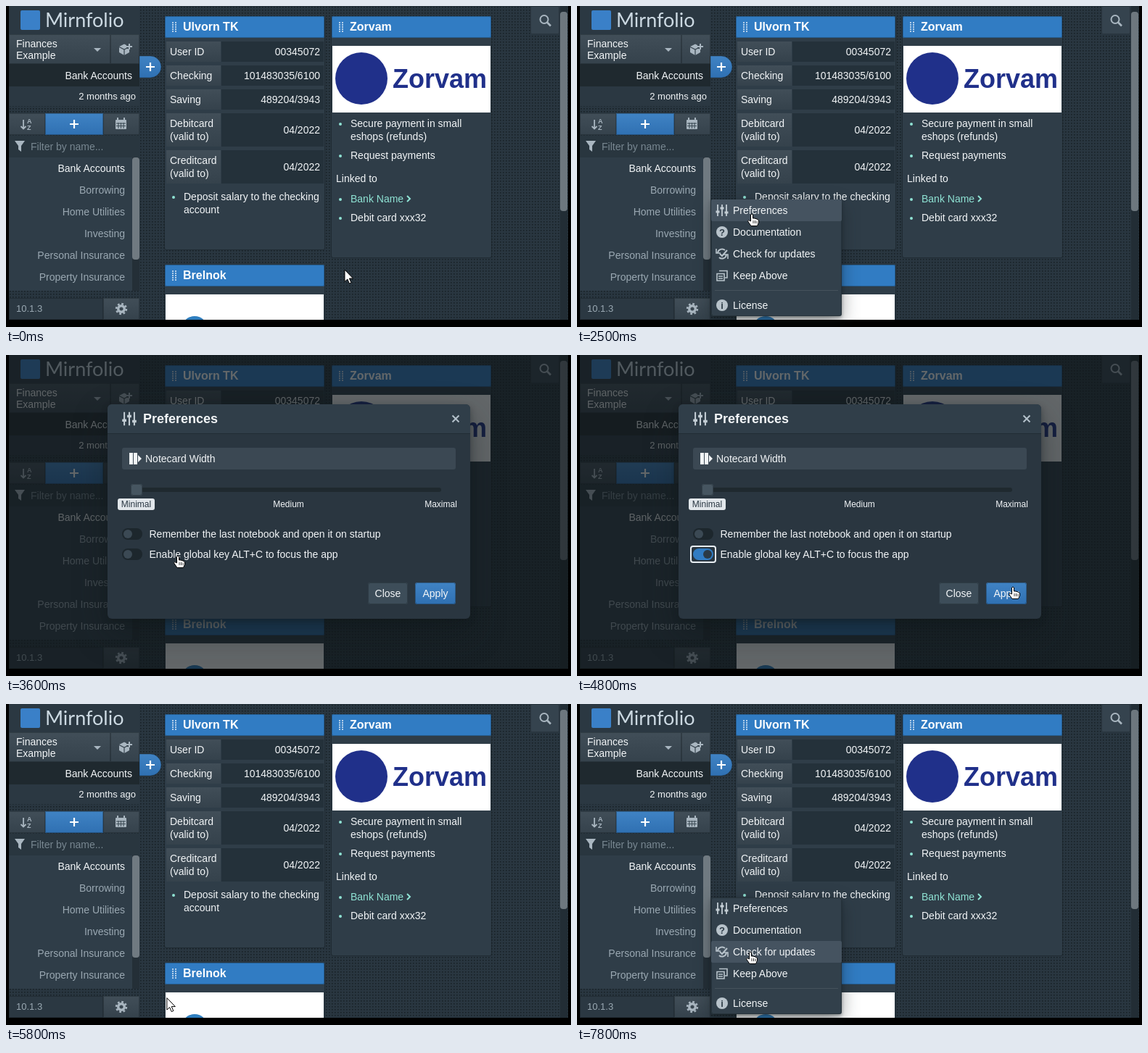
Recreate the animation shown at these times as an HTML page. Size 779 by 443 pixels, loop 8 s.

```html
<!DOCTYPE html>
<html lang="en">
<head>
<meta charset="utf-8">
<title>Notebook preferences</title>
<style>
html, body { margin: 0; width: 100%; height: 100%; overflow: hidden; background: #000; }
svg { display: block; }
text { font-family: "Liberation Sans", Arial, sans-serif; white-space: pre; }
.logo text { font-family: Lato, sans-serif; }
#menu { filter: drop-shadow(0 2px 2px rgba(16,22,26,.4)) drop-shadow(0 8px 12px rgba(16,22,26,.4)); }
#dialog { filter: drop-shadow(0 4px 4px rgba(16,22,26,.4)) drop-shadow(0 18px 23px rgba(16,22,26,.4)); }
</style>
</head>
<body>
<svg id="stage" width="779" height="443" viewBox="0 0 779 443"></svg>
<script>
const WHITE = '#f2f5f7', MUTED = '#9aa8b2', ICON = '#a9b6c0', TEAL = '#8fe3d4';
const BLUE = '#317cc3', PANEL = '#2f3d48', DARK = '#202b32', GREY = 'url(#grey)', SHINE = 'url(#blue)';

const rect = (x, y, w, h, fill, r = 0, more = '') =>
  `<rect x="${x}" y="${y}" width="${w}" height="${h}" rx="${r}" fill="${fill}" ${more}/>`;
const circle = (x, y, r, fill, more = '') => `<circle cx="${x}" cy="${y}" r="${r}" fill="${fill}" ${more}/>`;
const line = (d, color = ICON, w = 2) => `<path d="${d}" fill="none" stroke="${color}" stroke-width="${w}"/>`;
const shape = (d, fill = ICON, more = '') => `<path d="${d}" fill="${fill}" ${more}/>`;
const text = (x, y, s, fill = WHITE, size = 14, anchor = 'start', weight = 400) =>
  `<text x="${x}" y="${y}" fill="${fill}" font-size="${size}" text-anchor="${anchor}" font-weight="${weight}">${s}</text>`;
const right = (x, y, s, fill, size) => text(x, y, s, fill, size, 'end');
const mid = (x, y, s, fill, size) => text(x, y, s, fill, size, 'middle');
const at = (x, y, s) => `<g transform="translate(${x} ${y})">${s}</g>`;
// Filled box with a darker edge inside
const box = (x, y, w, h, fill = GREY, r = 0, more = '') => rect(x, y, w, h, fill, r, more) +
  rect(x + .5, y + .5, w - 1, h - 1, 'none', r, 'stroke="#10161a" stroke-opacity=".3"');

// Icons are drawn around their own centre
const gear = circle(0, 0, 4.3, 'none', `stroke="${ICON}" stroke-width="3.4"`) +
  circle(0, 0, 6.9, 'none', `stroke="${ICON}" stroke-width="2.6" stroke-dasharray="2.71"`);
const sliders = line('M-6-8V8M0-8V8M6-8V8', '#c3cdd4', 1.8) + line('M-8.5 2H-3.5M-2.5-3H2.5M3.5 3H8.5', '#c3cdd4', 3);
const plus = line('M-6 0H6M0-6V6', '#fff', 2.2);
const cube = shape('M-8-4L-1-7.500L2-6V-2L6 0V4L-1 8L-8 4Z') + line('M-8-3.500L-1 0L5-3M-1 0V8', '#36434d', 1.2) + line('M6-8V0M2-4H10');
const badge = s => circle(0, 0, 8, '#b8c3cb') + text(0, 5, s, PANEL, 13, 'middle', 700);
const refresh = line('M-6-1A6 6 0 0 1 4-5M6 1A6 6 0 0 1-4 5M-3 0L0 3L7-5', '#b8c3cb') + line('M-8-7V-1H-2M8 7V1H2', '#b8c3cb', 1.6);
const windows = line('M-4-6.5H7V3H4M-7-2.5H3V7H-7ZM-5 1H1M-5 4H1', '#b8c3cb', 1.6);

function header(x, y, title) {
  let s = box(x, y, 220, 30, BLUE, 2);
  for (let i = 0; i < 10; i++) s += rect(x + 10 + i % 2 * 4, y + 8 + (i >> 1) * 3, 2, 2, '#b5d0ea');
  return s + text(x + 25, y + 20, title, '#fff', 16, 'start', 700);
}
const card = (x, y, h, title) =>
  rect(x - 1, y, 222, h + 1, '#18212780', 3) + rect(x, y, 220, h, PANEL, 2) + header(x, y, title);
const bullet = (x, y, s, fill) => circle(x, y - 4, 2, TEAL) + text(x + 14, y, s, fill);

function fields() {
  const rows = [['00345072', 'User ID'], ['101483035/6100', 'Checking'], ['489204/3943', 'Saving'],
    ['04/2022', 'Debitcard', '(valid to)'], ['04/2022', 'Creditcard', '(valid to)']];
  let y = 49, s = '';
  for (const [value, ...label] of rows) {
    const h = 10 + 18 * label.length;
    s += rect(221, y, 75, h, GREY) + rect(297, y, 141, h, '#24313a') +
      label.map((word, i) => text(226, y + 19 + i * 18, word)).join('') + right(433, y + h / 2 + 5, value);
    y += h + 5;
  }
  return s;
}

function sidebar() {
  const notes = ['Bank Accounts', 'Borrowing', 'Home Utilities', 'Investing', 'Personal Insurance', 'Property Insurance'];
  return rect(4, 0, 180, 138, '#2b3842') + rect(20, 6, 27, 27, '#3a80c8', 2) +
    `<g class="logo">${text(54, 29, 'Mirnfolio', '#ccd9e2', 27)}</g>` +
    box(4, 39, 140, 41) + box(144, 39, 40, 41) +
    text(14, 57, 'Finances') + text(14, 73, 'Example') + shape('M121 58H131L126 63Z') + at(164, 60, cube) +
    rect(4, 80, 180, 31, '#1f292f') + right(174, 101, 'Bank Accounts') + right(179, 129, '2 months ago', WHITE, 13) +
    box(4, 148, 50, 30) + box(54, 148, 80, 30, SHINE) + box(134, 148, 50, 30) +
    line('M24 157V169M20.500 166L24 169.500L27.500 166', ICON, 1.8) +
    text(29, 162, 'A', ICON, 9, 'start', 700) + text(29, 171, 'Z', ICON, 9, 'start', 700) + at(94, 163, plus) +
    rect(151, 157, 15, 13, ICON, 1) + line('M154 154V158M163 154V158') +
    line('M152 162H165M152 165.500H165M155 161V169M158.500 161V169M162 161V169', '#394852', 1) +
    rect(4, 179, 180, 30, '#29363f') + shape('M12 186H26L21 193V201L17 198V193Z') + text(34, 199, 'Filter by name...', '#788791') +
    rect(4, 209, 170, 184, PANEL) + rect(174, 209, 10, 184, '#242f37') + rect(174, 209, 10, 141, '#707a81', 4) +
    notes.map((s, i) => right(164, 229 + i * 30, s, i ? MUTED : WHITE)).join('') +
    box(4, 403, 130, 30, '#2b3842') + text(14, 422, '10.1.3', MUTED, 13) +
    box(134, 403, 50, 30, GREY, 0, 'id="gear"') + at(159, 418, gear) +
    shape('M184 69H199A15 15 0 0 1 199 99H184Z', SHINE, 'stroke="#10161a" stroke-opacity=".3"') + at(199, 84, plus);
}

function cards() {
  return card(219, 14, 322, 'Ulvorn TK') + fields() +
    bullet(231, 268, 'Deposit salary to the checking') + text(245, 286, 'account') +
    card(449, 14, 333, 'Zorvam') + rect(450, 55, 218, 92, '#fff') +
    circle(490, 100, 36, '#20308a') + text(533, 113, 'Zorvam', '#20308a', 36, 'start', 700) +
    bullet(461, 167, 'Secure payment in small') + text(475, 185, 'eshops (refunds)') +
    bullet(461, 211, 'Request payments') + text(455, 243, 'Linked to') +
    bullet(461, 271, 'Bank Name', TEAL) + line('M553 262L557 266L553 270', TEAL) + bullet(461, 297, 'Debit card xxx32') +
    card(219, 357, 90, 'Brelnok') + rect(220, 398, 218, 40, '#fff') + circle(260, 446, 18, '#2f7fc0');
}

function menu() {
  const items = [[sliders, 'Preferences'], [badge('?'), 'Documentation'], [refresh, 'Check for updates'],
    [windows, 'Keep Above'], [badge('i'), 'License']];
  return box(185, 267, 180, 161, '#32404b', 3) + rect(185, 267, 180, 30, '#455360', 2, 'id="row"') +
    line('M190 392.500H360', '#45525c', 1) +
    items.map(([icon, s], i) => at(200, 282 + 30 * i + (i > 3 ? 11 : 0), icon + text(15, 5, s))).join('');
}

const toggle = (y, label, id) => rect(160, y - 8, 28, 16, '#1d272d', 8, `id="${id}"`) +
  circle(168, y, 6, '#3b4954', `id="${id}Knob"`) + text(197.5, y + 5, label);
const button = (x, w, label, fill) => box(x, 314, w, 30, fill, 3) + mid(x + w / 2, 334, label);

function dialog() {
  return rect(140, 68, 500, 296, '#2a3640', 6) +
    shape('M140 108V74A6 6 0 0 1 146 68H634A6 6 0 0 1 640 74V108Z', '#303e49') + line('M140 108.500H640', '#212c34', 1) +
    `<g transform="translate(170 88) scale(1.15)">${sliders}</g>` + text(189, 94, 'Preferences', WHITE, 18, 'start', 700) +
    line('M615.500 83.500L624.500 92.500M624.500 83.500L615.500 92.500', '#b3c0ca') +
    rect(160, 128, 460, 30, '#3b4853', 3) + shape('M170 135H175V151H170ZM176 135H181V151H176ZM182 138L187 143L182 148Z', WHITE) +
    text(192, 148, 'Notecard Width') +
    rect(172, 183, 428, 6, '#1f292f', 3) + box(172, 178, 16, 16, '#465560', 3) + rect(154, 198, 51, 16, '#e2e7eb', 3) +
    ['Minimal', 'Medium', 'Maximal'].map((s, i) => mid(179.5 + 210 * i, 210, s, i ? WHITE : '#293742', 12)).join('') +
    rect(157, 264, 34, 22, 'none', 3, 'id="ring" stroke="#e8eef3" stroke-width="2"') +
    toggle(247, 'Remember the last notebook and open it on startup', 'startup') +
    toggle(275, 'Enable global key ALT+C to focus the app', 'hotkey') +
    button(499, 55, 'Close', '#3d4d59') + button(564, 56, 'Apply', SHINE);
}

const arrow = shape('M0 0V16.500L3.800 13L6.400 19L9 17.900L6.400 12H11.500Z', '#fff', 'stroke="#000"');
const hand = shape('M-1.500 0Q0-2 1.500 0V5H4L7 6L9.500 7.500V11L7.500 15.500H-1L-5.500 9Q-5 6.500-2.500 8.500L-1.500 9Z', '#fff', 'stroke="#000"') +
  line('M2 8V12M4.500 8V12M7 8.500V12', '#000', 0.8);

const gradient = (id, top, bottom) =>
  `<linearGradient id="${id}" x2="0" y2="1"><stop stop-color="${top}"/><stop offset="1" stop-color="${bottom}"/></linearGradient>`;
const $ = id => document.getElementById(id);
$('stage').innerHTML = `<defs>
  <pattern id="dots" width="4" height="4" patternUnits="userSpaceOnUse">${rect(0, 0, 4, 4, '#293640')}${rect(1, 1, 1.6, 1.6, '#182127')}</pattern>
  ${gradient('blue', '#4083c4', '#2f70b2')}${gradient('grey', '#414e58', '#35424c')}
  <clipPath id="frame">${rect(4, 0, 771, 433, '#fff')}</clipPath></defs>
  <g clip-path="url(#frame)">${rect(4, 0, 771, 433, 'url(#dots)')}${cards()}${sidebar()}
  ${box(723, 0, 40, 39, '#35434e', 2)}${circle(742, 18.5, 5.5, 'none', `stroke="${ICON}" stroke-width="2"`)}${line('M746 22.500L751 27.500', ICON, 2.6)}
  ${rect(764, 0, 10, 433, '#222d35')}${rect(764, 8, 10, 275, '#6d777e', 4)}</g>
  <g id="menu">${menu()}</g>${rect(4, 0, 771, 433, '#10161a', 0, 'id="shade"')}
  <g id="dialog">${dialog()}</g><g id="cursor"><g id="arrow">${arrow}</g><g id="hand">${hand}</g></g>`;

const ramp = (t, from, to) => Math.min(1, Math.max(0, (t - from) / (to - from)));
const easeOut = p => 1 - (1 - p) ** 2;
const shown = (t, open, close, length) =>
  easeOut(ramp(t, open, open + length)) * (1 - easeOut(ramp(t, close, close + length)));
const inside = (x, y, left, top, w, h) => x >= left && x < left + w && y >= top && y < top + h;

// Pointer glides: start, end, destination
const glides = [[300, 700, 146, 418], [1600, 2200, 241, 288], [3000, 3600, 237, 278], [3900, 4800, 601, 321],
  [5300, 5900, 211, 408], [6000, 6300, 157, 416], [7100, 7800, 239, 343]];
const pointer = t => glides.reduce(([x, y], [from, to, nx, ny]) => {
  const p = easeOut(ramp(t, from, to));
  return [x + (nx - x) * p, y + (ny - y) * p];
}, [467, 364]);

function set(id, attrs) {
  for (const name in attrs) $(id).setAttribute(name, attrs[name]);
}
const scaled = (x, y, s) => `translate(${x} ${y}) scale(${s}) translate(${-x} ${-y})`;

function draw(now) {
  const t = Math.floor(now % 8000 / 100) * 100;
  const [x, y] = pointer(t);
  const menuShown = shown(t, 1100, 2500, 200) + shown(t, 6900, 8000, 200);
  const dialogShown = shown(t, 2500, 5000, 300), fade = dialogShown ** .7;

  const overMenu = menuShown === 1 && inside(x, y, 185, 267, 180, 161);
  const overDialog = t > 2500 && t <= 5300 && (inside(x, y, 160, 264, 300, 21) || inside(x, y, 564, 314, 56, 30));
  const isHand = overMenu || overDialog;
  set('cursor', { transform: `translate(${x} ${y})` });
  set('arrow', { opacity: isHand ? 0 : 1 });
  set('hand', { opacity: isHand ? 1 : 0 });

  const pressed = t === 1100 || t === 6900, hover = !menuShown && inside(x, y, 134, 403, 50, 30);
  set('gear', { fill: pressed ? DARK : hover ? '#30404d' : GREY });
  set('menu', { opacity: menuShown, transform: scaled(185, 413, .8 + .2 * menuShown) });
  set('row', { y: y < 387 ? 267 + 30 * Math.floor((y - 267) / 30) : 398, opacity: overMenu ? 1 : 0 });

  set('shade', { opacity: .65 * fade });
  set('dialog', { opacity: fade, transform: scaled(390, 216, .6 + .4 * dialogShown) });
  const on = t >= 3900;
  set('ring', { opacity: on ? 1 : 0 });
  set('hotkey', { fill: on ? BLUE : '#1d272d' });
  set('hotkeyKnob', { cx: 168 + 12 * ramp(t, 3800, 4000), fill: on ? '#2b3a46' : '#3b4954' });
}

const start = performance.now();
(function loop() {
  draw(performance.now() - start);
  requestAnimationFrame(loop);
})();
</script>
</body>
</html>
```
